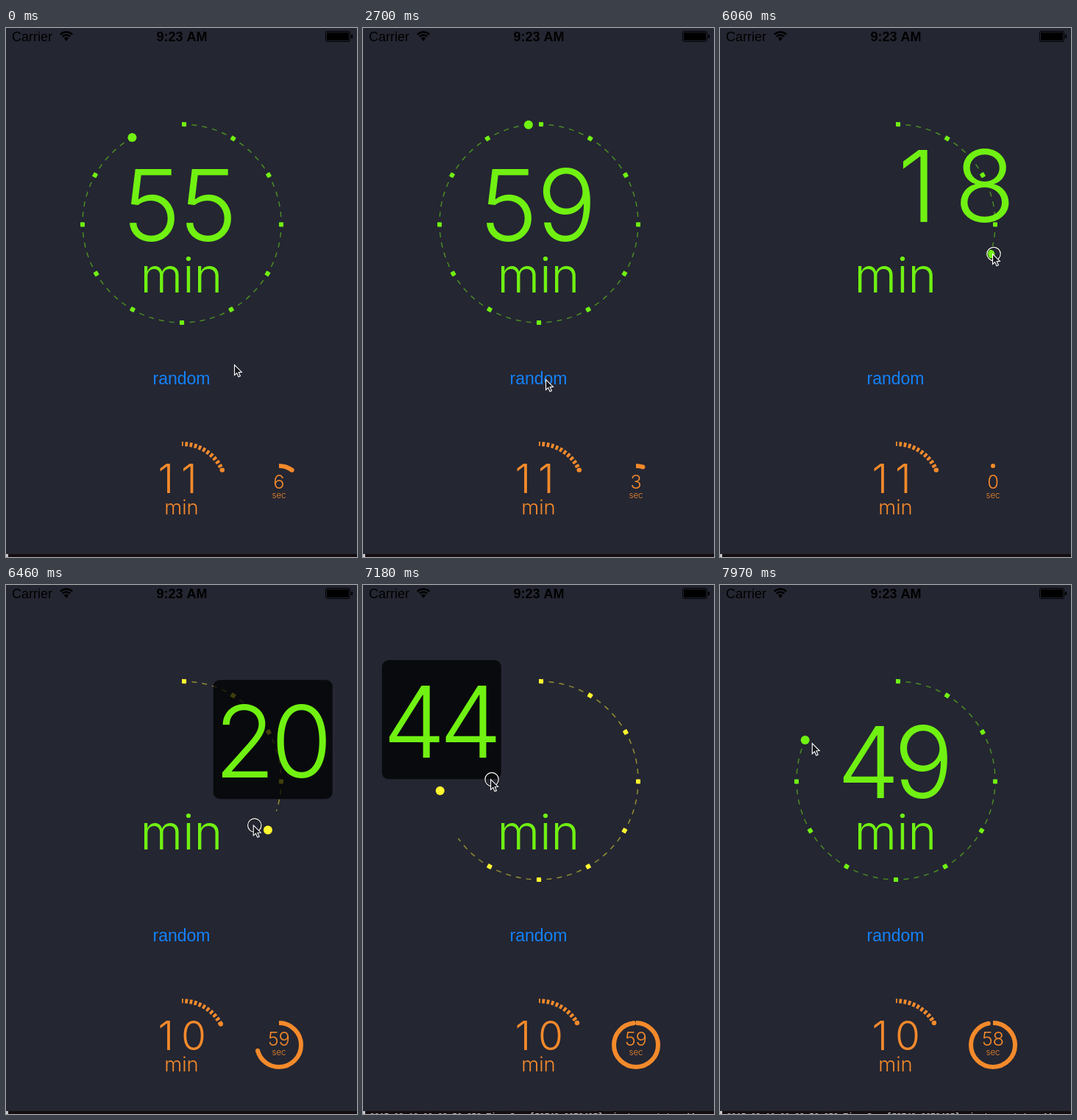
These frames come from a looping animation (477 by 720 pixels, 8 s). An HTML page with a canvas:

```html
<!DOCTYPE html>
<html lang="en">
<head>
<meta charset="utf-8">
<title>Timer dial</title>
<style>
  html, body { margin: 0; width: 100%; height: 100%; overflow: hidden; background: #242632; }
  canvas { display: block; width: 477px; height: 720px; }
</style>
</head>
<body>
<canvas id="stage" width="477" height="720"></canvas>
<script>
const ctx = document.getElementById('stage').getContext('2d');
const LOOP = 8000, TAU = Math.PI * 2;
const BG = '#242632', ORANGE = '#f48a2b', BLUE = '#1482fa';
const GREEN = [112, 241, 18], YELLOW = [255, 247, 48];
const LIGHT = 'Inter, Roboto, sans-serif';
const PLAIN = '"Liberation Sans", Arial, sans-serif';

const dial = { x: 239, y: 266, r: 135 };
const minuteDial = { x: 239, y: 626, r: 60 };
const secondDial = { x: 371, y: 626, r: 30 };

const mix = (a, b, k) => a + (b - a) * k;
const mixAll = (a, b, k) => a.map((v, i) => mix(v, b[i], k));
const span = (t, from, to) => Math.min(1, Math.max(0, (t - from) / (to - from)));
const smooth = (t, from, to) => { const k = span(t, from, to); return k * k * (3 - 2 * k); };
const easeOut = (t, from, to) => 1 - (1 - span(t, from, to)) ** 2;
const rgb = c => `rgb(${c.map(Math.round).join(',')})`;

// Each press of the button picks a new value on release.
const HOLD = 130;
const PRESSES = [
  { at: 1920, pick: 59 }, { at: 3050, pick: 38 },
  { at: 3790, pick: 59 }, { at: 4430, pick: 18 }
];
const GRAB = 6000, SWEEP = [6278, 7448], DROP = 7530;

const swept = t => 18 + 31 * smooth(t, ...SWEEP);

function picked(t) {
  let value = 55, arc = 55;
  for (const { at, pick } of PRESSES) {
    if (t < at + HOLD) break;
    arc = mix(value, pick, easeOut(t, at + HOLD, at + HOLD + 200));
    value = pick;
  }
  return { value, arc };
}

// Seconds left on the countdown, starting at 11 min 6 s.
function countdown(t) {
  const first = 650, period = 955;
  const ticks = t < first ? 0 : Math.floor((t - first) / period) + 1;
  const left = 11 * 60 + 6 - ticks;
  const begin = first + (ticks - 1) * period;
  const k = ticks ? easeOut(t, begin, begin + 170) : 1;
  const unit = of => ({ value: of(left), arc: mix(of(left + (ticks ? 1 : 0)), of(left), k) });
  return { minutes: unit(s => Math.floor(s / 60)), seconds: unit(s => s % 60) };
}

function pointOn({ x, y, r }, units) {
  const a = units / 60 * TAU;
  return [x + r * Math.sin(a), y - r * Math.cos(a)];
}

function strokeArc(d, units, width, dash = [], offset = 0) {
  if (units <= 0) return;
  ctx.beginPath();
  ctx.arc(d.x, d.y, d.r, -TAU / 4, units / 60 * TAU - TAU / 4);
  ctx.lineWidth = width;
  ctx.setLineDash(dash);
  ctx.lineDashOffset = offset;
  ctx.stroke();
  ctx.setLineDash([]);
}

function dot([x, y], r) {
  ctx.beginPath();
  ctx.arc(x, y, r, 0, TAU);
  ctx.fill();
}

function text(str, x, y, font, color, align = 'center') {
  ctx.font = font;
  ctx.fillStyle = color;
  ctx.textAlign = align;
  ctx.fillText(str, x, y);
}

const label = (str, x, y, size, color) => text(str, x, y, `300 ${size}px ${LIGHT}`, color);

// Digits stand in cells of equal width.
function number(value, x, y, size, color) {
  const digits = String(value), cell = size * 0.57;
  const left = x - digits.length * cell / 2 - size * 0.02;
  [...digits].forEach((digit, i) =>
    text(digit, left + i * cell, y, `300 ${size}px ${LIGHT}`, color, 'left'));
}

function drawStatusBar() {
  text('Carrier', 8, 18, `18px ${PLAIN}`, '#000', 'left');
  text('9:23 AM', 239, 18, `bold 18px ${PLAIN}`, '#000');
  ctx.strokeStyle = '#000';
  ctx.lineWidth = 2.4;
  for (const r of [7.5, 11.5]) {
    ctx.beginPath();
    ctx.arc(82, 17, r, -TAU * 0.375, -TAU * 0.125);
    ctx.stroke();
  }
  ctx.beginPath();
  ctx.moveTo(82, 18);
  ctx.arc(82, 17, 4.5, -TAU * 0.375, -TAU * 0.125);
  ctx.fill();
  ctx.lineWidth = 1;
  ctx.beginPath();
  ctx.roundRect(434.5, 4.5, 33, 14, 2);
  ctx.stroke();
  ctx.fillRect(436, 6, 30, 11);
  ctx.fillRect(469, 9, 2, 5);
}

function drawConsole(t) {
  ctx.fillStyle = '#140e12';
  ctx.fillRect(0, 716, 477, 4);
  ctx.fillStyle = '#c8c8cc';
  ctx.fillRect(0, 716, 3, 4);
  if (t >= 6900) {
    text('2015-03-10 09:23:56.253 TimerDemo[53743:2073435] minutes set to: 44',
      9, 725.5, 'bold 11px "Liberation Mono", monospace', '#bbb', 'left');
  }
}

function drawDial(t) {
  const pick = picked(t), dragging = t >= GRAB;
  const value = dragging ? Math.floor(swept(t)) : pick.value;
  const arc = dragging ? swept(t - 175) : pick.arc;
  const tint = span(t, 6150, 6300) - span(t, 7600, 7760);

  ctx.strokeStyle = ctx.fillStyle = rgb(mixAll(GREEN, YELLOW, tint));
  ctx.globalAlpha = 0.5;
  strokeArc(dial, arc, 1.5, [7, 7.03], 0.5);
  ctx.globalAlpha = 1;
  strokeArc(dial, arc, 6, [6, 64.15]);
  dot(pointOn(dial, value), 6);

  label('min', 238.5, 360, 66, rgb(GREEN));
  drawValue(t, value);
}

// While dragged, the value floats on a card above the knob and trails it a little.
function drawValue(t, value) {
  const [knobX, knobY] = pointOn(dial, swept(t - 60));
  const lift = easeOut(t, GRAB, 6150) * (1 - smooth(t, 7580, 7930));
  const [x, y] = mixAll([239, 238], [knobX, knobY - 110], lift);
  const cover = t < DROP ? span(t, 6150, 6250) : 0;
  ctx.fillStyle = `rgba(0,0,0,${0.75 * cover})`;
  ctx.beginPath();
  ctx.roundRect(x - 81, y - 81, 162, 162, 9);
  ctx.fill();
  number(value, x, y + 51.5, 135, rgb(GREEN));
}

function drawSmallDials(t) {
  const { minutes, seconds } = countdown(t);
  const gap = TAU * minuteDial.r / 60, tick = gap * 0.59;
  ctx.strokeStyle = ctx.fillStyle = ORANGE;
  strokeArc(minuteDial, minutes.arc, 6, [tick, gap - tick], tick / 2);
  dot(pointOn(minuteDial, minutes.arc), 3.2);
  strokeArc(secondDial, seconds.arc, 6);
  dot(pointOn(secondDial, seconds.arc), 3);
  number(minutes.value, 239, 633, 55, ORANGE);
  label('min', 238.5, 662, 27.5, ORANGE);
  number(seconds.value, 371, 627, 25.5, ORANGE);
  label('sec', 371, 640, 11.5, ORANGE);
}

function drawButton(t) {
  const last = PRESSES.findLast(press => t >= press.at);
  ctx.globalAlpha = last ? mix(0.2, 1, span(t, last.at + HOLD, last.at + HOLD + 160)) : 1;
  text('random', 238.5, 484.5, `23px ${PLAIN}`, BLUE);
  ctx.globalAlpha = 1;
}

function pointerAt(t) {
  if (t >= SWEEP[0]) {
    const inward = smooth(t, 6300, 6700) - smooth(t, 7200, SWEEP[1]);
    const r = mix(138, 125, span(t, ...SWEEP)) - 62 * inward;
    return pointOn({ ...dial, r }, swept(t + 15));
  }
  let at = mixAll([310, 458], [248, 478], smooth(t, 1330, 1740));
  at = mixAll(at, [444, 214], smooth(t, 4700, 5200));
  return mixAll(at, [370, 307], smooth(t, 5260, 5770));
}

function drawPointer(t) {
  const [x, y] = pointerAt(t);
  const onButton = PRESSES.some(({ at }) => t >= at && t < at + HOLD);
  if (onButton || (t >= GRAB && t < DROP)) {
    for (const [color, width] of [['#111', 2.6], ['#fff', 1.2]]) {
      ctx.strokeStyle = color;
      ctx.lineWidth = width;
      ctx.beginPath();
      ctx.arc(x + 2, y + 0.5, 9.2, 0, TAU);
      ctx.stroke();
    }
  }
  ctx.save();
  ctx.translate(x + 0.5, y + 0.5);
  ctx.fillStyle = '#15161c';
  ctx.strokeStyle = '#fff';
  ctx.lineWidth = 1.1;
  const arrow = new Path2D('M0 0V14L3.2 11.1 5.5 16.3 7.9 15.3 5.7 10.1 9.9 9.9Z');
  ctx.fill(arrow);
  ctx.stroke(arrow);
  ctx.restore();
}

function draw(t) {
  ctx.fillStyle = BG;
  ctx.fillRect(0, 0, 477, 720);
  drawStatusBar();
  drawSmallDials(t);
  drawButton(t);
  drawDial(t);
  drawConsole(t);
  drawPointer(t);
}

let start;
function frame(now) {
  start ??= now;
  draw((now - start) % LOOP);
  requestAnimationFrame(frame);
}
draw(0);
requestAnimationFrame(frame);
</script>
</body>
</html>
```
